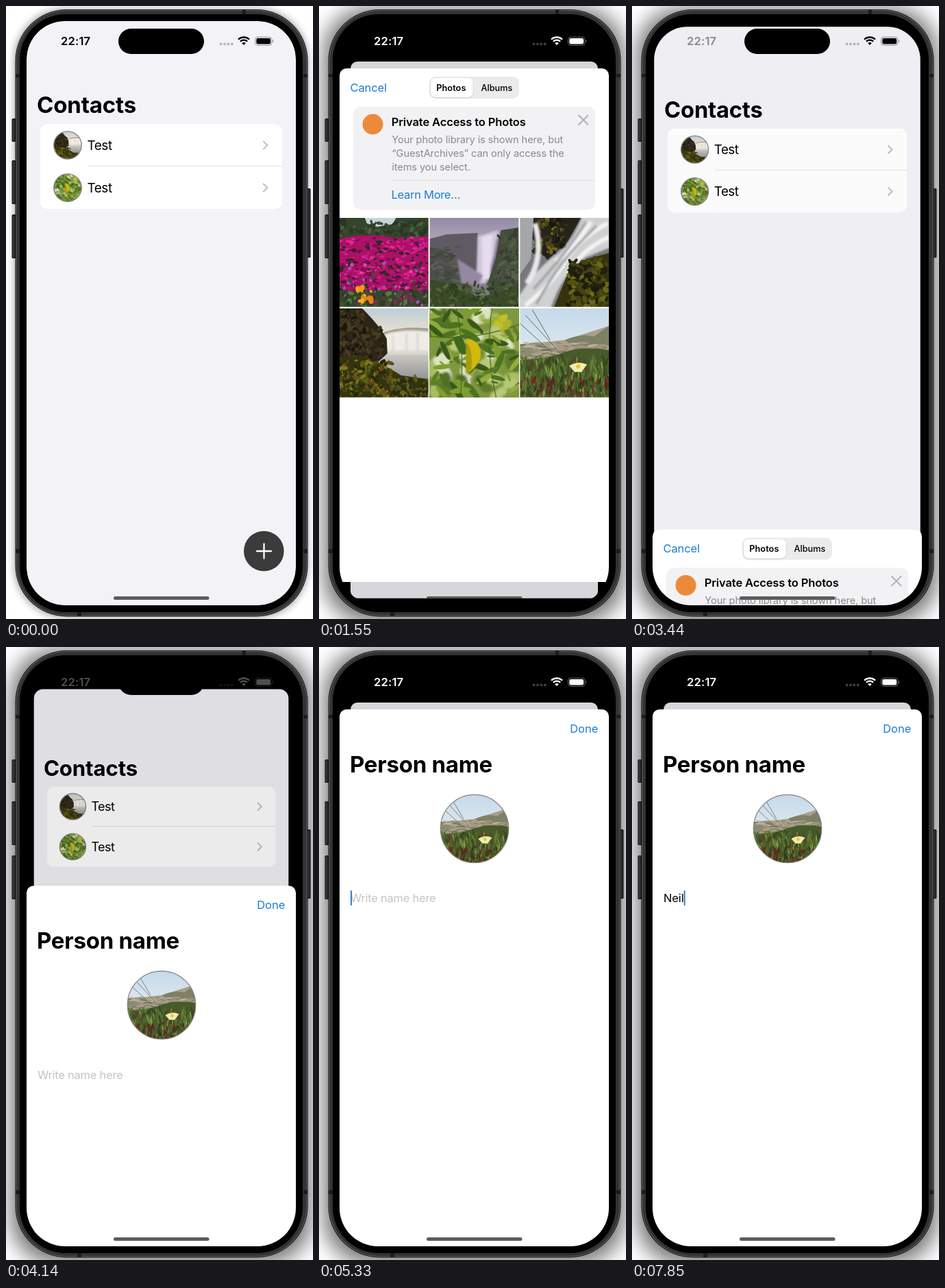
Animation, 448 px wide and 894 px high, one loop 8 s. Source, as an HTML page:

```html
<!DOCTYPE html>
<html lang="en">
<head>
<meta charset="utf-8">
<title>Contacts</title>
<style>
html, body { margin: 0; width: 100%; height: 100%; overflow: hidden; background: #fff; }
svg { display: block; }
#stage { width: 448px; height: 894px; }
text { font-family: Inter, "Liberation Sans", sans-serif; font-optical-sizing: none; white-space: pre; }
</style>
</head>
<body>
<script>
const LOOP = 8000, STEP = 70, BLUE = '#1c7dd6', NAME = 'Neil';

// markup helpers
let seed = 7;
const rnd = () => (seed = (seed * 16807) % 2147483647) / 2147483647;
const rect = (x, y, w, h, r, fill, more = '') =>
  `<rect x="${x}" y="${y}" width="${w}" height="${h}" rx="${r}" fill="${fill}" ${more}/>`;
const circle = (x, y, r, fill, more = '') => `<circle cx="${x}" cy="${y}" r="${r}" fill="${fill}" ${more}/>`;
const path = (d, fill, more = '') => `<path d="${d}" fill="${fill}" ${more}/>`;
const line = (d, color, w, more = '') =>
  `<path d="${d}" fill="none" stroke="${color}" stroke-width="${w}" ${more}/>`;
const text = (x, y, size, weight, fill, gap, str, more = '') =>
  `<text x="${x}" y="${y}" font-size="${size}" font-weight="${weight}" fill="${fill}" letter-spacing="${gap}" ${more}>${str}</text>`;
const grad = (id, ...stops) => `<linearGradient id="${id}" x2="0" y2="1">` +
  stops.map((c, i) => `<stop offset="${i / (stops.length - 1)}" stop-color="${c}"/>`).join('') + '</linearGradient>';
const blur = (id, dev) =>
  `<filter id="${id}" x="-50%" y="-50%" width="200%" height="200%"><feGaussianBlur stdDeviation="${dev}"/></filter>`;
const photo = (id, body) =>
  `<symbol id="${id}" viewBox="0 0 130 130"><g filter="url(#lens)">${body}</g></symbol>`;
const soft = body => `<g filter="url(#soft)">${body}</g>`;

// scattered specks inside a box
function specks(n, [x, y, w, h], rx, ry, colors, tilt = 180) {
  let out = '';
  for (let i = 0; i < n; i++) {
    const cx = (x + rnd() * w).toFixed(1), cy = (y + rnd() * h).toFixed(1), k = 0.5 + rnd();
    const turn = ((rnd() - 0.5) * tilt).toFixed(0), fill = colors[Math.floor(rnd() * colors.length)];
    out += `<ellipse cx="${cx}" cy="${cy}" rx="${(rx * k).toFixed(1)}" ry="${(ry * k).toFixed(1)}" fill="${fill}" transform="rotate(${turn} ${cx} ${cy})"/>`;
  }
  return out;
}

const flowers = photo('flowers',
  rect(-5, -5, 140, 140, 0, '#35452b') + path('M35-5H85L78 9 55 13 40 8z', '#c9d3da') +
  specks(90, [0, 4, 130, 22], 3.5, 2, ['#27361f', '#4d5f3b', '#3a4a35', '#2b3a28']) +
  path('M-5 32Q30 22 65 27T135 26V106H-5z', '#ac1068') +
  specks(330, [0, 29, 130, 78], 3, 1.5, ['#d61a88', '#e02b98', '#b81273', '#7c0d4e', '#4a1a36', '#2f2a26'], 40) +
  specks(90, [0, 66, 130, 62], 2, 1.8, ['#3c4b2b', '#a050b4', '#d050a8', '#2b3520']) +
  specks(60, [0, 108, 130, 22], 4, 2.5, ['#3f552d', '#2c3b22', '#5b7a3a', '#7a2a58']) +
  specks(16, [27, 102, 20, 20], 4, 3, ['#f29a12', '#ffb01f', '#e58410']));

const valley = photo('valley',
  rect(-5, -5, 140, 140, 0, '#80768d') + rect(-5, -5, 140, 36, 0, 'url(#dusk)') +
  path('M-5 32 25 24 70 22 72 100H-5z', '#5f5a63') +
  path('M-5 44Q28 38 55 84L70 130H-5z', '#4b4f48') +
  specks(60, [0, 40, 44, 55], 5, 1.5, ['#545650', '#43473f', '#5d5c5d'], 60) +
  soft(path('M70 27 100 18 94 55 82 96H68z', '#cfc5da') + path('M76 28 92 24 88 90H77z', '#e6dced') +
    path('M40 60 78 84 70 100 46 96z', '#9688a2')) +
  path('M130 14 104 18 96 60 84 98 96 112 135 104z', '#454c3d') +
  specks(70, [99, 22, 34, 76], 5, 2, ['#363e30', '#56604a', '#4a553b']) +
  path('M-5 90Q30 92 52 108T135 96V135H-5z', '#3a4a28') +
  specks(120, [0, 96, 130, 34], 4, 1.6, ['#48602e', '#2f3d1f', '#56693a', '#3d4c2a']));

const rapids = photo('rapids',
  rect(-5, -5, 140, 140, 0, '#77777a') + path('M20-5H92L70 34 40 62 18 30z', '#26241a') +
  specks(80, [22, 0, 46, 50], 4, 2.5, ['#4a4418', '#17160f', '#333018', '#6e6420', '#222018']) +
  path('M-5-5H20L16 60-5 90z', '#a5a6a8') +
  soft(path('M135-5H92Q78 36 50 56T-5 120V135H44Q62 80 96 58L135 42z', '#cfd0d2') +
    line('M128 8Q86 30 66 64T8 128M104 6Q76 48 52 64M130 28Q90 46 70 82', '#f4f4f4', 6) +
    line('M112 12Q82 40 62 66T24 126M96 6Q70 50 20 104', '#9c9da0', 3.5) +
    line('M22 8Q36 60 10 96', '#e8e8ea', 8)) +
  path('M135 50 98 60 72 76 48 135H135z', '#35330f') +
  specks(170, [70, 60, 60, 70], 4.5, 2.5, ['#55520f', '#22210f', '#434214', '#6d6918', '#1b1a10']));

const falls = photo('falls',
  rect(-5, -5, 140, 140, 0, 'url(#cream)') + path('M60 36Q95 24 135 30V70H60z', '#a69c8a') +
  soft(path('M66 38Q90 29 135 34V68H66z', '#efece8') + line('M78 40V66M98 36V66M114 36V66', '#dcd7cf', 3) +
    path('M56 62H135V72H56z', '#d9d5cf')) +
  rect(50, 68, 85, 40, 0, 'url(#pool)') +
  path('M-5-5H28Q44 10 60 30L69 44 70 66 50 84H-5z', '#2d2518') +
  specks(130, [0, 2, 34, 72], 4, 2.2, ['#3f321c', '#1b160f', '#4d3c20', '#2a2a16']) +
  specks(60, [30, 28, 34, 44], 4, 2.2, ['#3f321c', '#1b160f', '#4a3a20', '#2a2616']) +
  path('M-5 72Q30 66 54 78T90 98L135 104V135H-5z', '#34350f') +
  specks(190, [0, 76, 78, 54], 3.4, 1.9, ['#5f6016', '#24250e', '#7d771d', '#4a4a12', '#6d4a1a', '#2b2a12']) +
  specks(70, [76, 102, 54, 28], 4, 2, ['#50501a', '#2a2a11', '#68621d']));

const leaves = photo('leaves',
  rect(-5, -5, 140, 140, 0, '#7f9840') +
  soft(specks(60, [0, 0, 130, 130], 11, 8, ['#a8bd62', '#dde3c2', '#5d7a2b', '#b9c878', '#8ea647', '#55702a'])) +
  specks(70, [0, 0, 130, 130], 12, 3.2, ['#4c7320', '#7f9f2b', '#385a19', '#93ad3c', '#5f7e28'], 150) +
  line('M38-5Q52 60 44 135M92-5Q80 60 98 135M-5 40Q60 50 135 22', '#48651f', 1.3) +
  path('M34 44Q50 30 54 66Q44 74 34 44z', '#3f681d') +
  path('M53 44Q74 46 75 68 72 86 53 95z', '#d2b90e') + path('M53 50Q63 58 61 88L53 95z', '#a89a0c') +
  specks(8, [92, 12, 22, 24], 6, 4, ['#c3bf2c', '#a9b32f']));

const dune = photo('dune',
  rect(-5, -5, 140, 140, 0, 'url(#sky)') + path('M-5 53 30 50 66 46 135 24V100H-5z', '#ab9f8a') +
  path('M66 46Q90 36 108 41L135 22V54L80 58z', '#7d8266') + path('M-5 56Q22 52 40 60L-5 72z', '#8b8c75') +
  specks(110, [0, 50, 130, 26], 6, 1.2, ['#c2b49e', '#8f866e', '#777a5f', '#a1957f'], 30) +
  path('M-5 76Q40 74 66 64T135 62V135H-5z', '#465a2a') +
  specks(280, [0, 72, 130, 58], 1.3, 6, ['#647f34', '#34481f', '#7c9a46', '#4e6a2a', '#56702f', '#5f3d2a'], 50) +
  specks(110, [0, 102, 130, 28], 1.3, 4.5, ['#5a2a20', '#743328', '#2e3a1a', '#4a5c2a'], 60) +
  line('M0 22 46 64M8 10 54 60M18 2 44 46', '#5d6a5c', 1) +
  path('M72 84Q85 76 98 82L90 93H80z', '#f0edaa') + circle(85, 85, 3, '#e0c93a'));

const avatar = (id, x, y, r) =>
  `<g clip-path="url(#clip-${id})"><use href="#${id}" x="${x - r}" y="${y - r}" width="${2 * r}" height="${2 * r}"/></g>` +
  circle(x, y, r - 0.3, 'none', 'stroke="#858585" stroke-width="1.3"');
const avatarClip = (id, x, y, r) => `<clipPath id="clip-${id}">${circle(x, y, r, '#000')}</clipPath>`;

const contact = (id, y) => avatar(id, 90, y, 20.5) + text(118.5, y + 7, 19, 400, '#000', -0.5, 'Test') +
  line(`M375.8 ${y - 5.5}l5.6 5.5-5.6 5.5`, '#bfbfc3', 2, 'stroke-linecap="round" stroke-linejoin="round"');

const contacts = rect(30, 22, 393, 852, 55, '#f2f2f7', 'id="card"') +
  text(45, 156, 33, 700, '#000', -0.15, 'Contacts') +
  rect(50, 172, 353, 124, 10, '#fff') + contact('falls', 203) + contact('leaves', 265) +
  rect(119, 233, 284, 0.8, 0, '#dcdcde') +
  circle(376.3, 795, 29.3, '#3b3b3c') +
  line('M366 795h21M376.5 784.5v21', '#fff', 2.3, 'stroke-linecap="round"') +
  rect(30, 22, 393, 852, 55, '#000', 'id="dim"');

const tiles = ['flowers', 'valley', 'rapids', 'falls', 'leaves', 'dune'].map((id, i) =>
  `<use href="#${id}" x="${30 + (i % 3) * 131.67}" y="${i < 3 ? 309 : 441}" width="129.67" height="129.67"/>`).join('');

const picker = `<g id="head">` + text(45.5, 125, 16.5, 400, BLUE, -0.1, 'Cancel') +
  rect(161, 103, 131, 32, 9, '#ebebec') +
  rect(163, 106, 61.5, 28, 7, '#000', 'opacity=".13" filter="url(#soft)"') +
  rect(163, 105, 61.5, 28, 7, '#fff') +
  text(171.2, 123.8, 12.7, 600, '#000', 0.1, 'Photos') + text(236.5, 123.8, 12.7, 500, '#000', 0, 'Albums') +
  rect(50, 147, 353, 150, 10, '#f2f2f4') + circle(78.5, 172.5, 15, '#ec8a3a') +
  text(105.8, 175, 16.5, 600, '#000', -0.12, 'Private Access to Photos') +
  ['Your photo library is shown here, but', '“GuestArchives” can only access the', 'items you select.']
    .map((s, i) => text(106.3, 199.6 + i * 20, 14.6, 400, '#8a8a8e', -0.1, s)).join('') +
  rect(106, 254, 297, 0.8, 0, '#d6d6d9') + text(105.6, 281, 16.5, 400, BLUE, -0.3, 'Learn More…') +
  line('M379 159.5l13.5 13.5M392.5 159.5l-13.5 13.5', '#b0b0b3', 2, 'stroke-linecap="round"') +
  `</g><g id="tiles">${tiles}</g>`;

const form = text(366.2, 125, 16.5, 400, BLUE, 0, 'Done') +
  text(45, 183, 33, 700, '#000', -0.25, 'Person name') + avatar('dune', 227, 265, 50) +
  text(46, 372.3, 16.5, 400, '#c4c4c7', -0.25, 'Write name here', 'id="hint"') +
  text(46, 372.3, 16.5, 400, '#000', -0.1, '', 'id="name"') +
  rect(46, 355, 2, 22, 0.8, '#2a7fd4', 'id="caret"');

const status = text(80, 57, 16.5, 600, '#000', 0.2, '22:17', 'id="clock"') +
  `<g id="icons" fill="#000" stroke="#000" stroke-width="0">` +
  [313.6, 319, 324.4, 329.8].map(x => `<circle cx="${x}" cy="55.5" r="1.9" opacity=".25"/>`).join('') +
  `<path d="M339 48.8a11.3 11.3 0 0 1 16 0M341.8 51.7a7.4 7.4 0 0 1 10.4 0" fill="none" stroke-width="2.3"/>
   <path d="M344.2 54.2a3.9 3.9 0 0 1 5.6 0L347 57z"/>
   <rect x="363.5" y="45.3" width="24.5" height="12" rx="3.8" fill="none" stroke-width="1" opacity=".4"/>
   <rect x="365.3" y="47.1" width="20.9" height="8.4" rx="2.3"/>
   <path d="M389.3 49.3q2 2 0 4z" opacity=".5"/></g>`;

const sideKey = (x, y, h) => rect(x, y, 6, h, 1.5, '#191919') + rect(x + 1, y + 1, 3, h - 2, 1, '#353535');
const phone = sideKey(8.5, 164, 34) + sideKey(8.5, 225, 64) + sideKey(8.5, 304, 64) + sideKey(438.5, 266, 101) +
  rect(13.5, 5, 427, 885.5, 75, '#111') + rect(14.5, 6, 425, 883.5, 74, '#666') +
  rect(15.5, 7, 423, 881.5, 73, '#333') +
  [[14, 99, 6, 5], [434, 99, 6, 5], [14, 792, 6, 6], [434, 792, 6, 6], [345, 6, 5, 6], [104, 884, 6, 6]]
    .map(([x, y, w, h]) => rect(x, y, w, h, 0, '#1c1c1c')).join('') +
  rect(20, 12, 413, 872, 67, '#000');

document.body.innerHTML = `<svg id="stage" viewBox="0 0 448 894"><defs>
${blur('lens', 0.5)}${blur('soft', 1.6)}${blur('near', 6)}${blur('far', 15)}
${grad('dusk', '#8d87a0', '#b0a2b8')}${grad('cream', '#b9cbd8', '#efe3cf', '#e8dcc8', '#e8dcc8')}
${grad('pool', '#c9c6c1', '#8b8f90')}${grad('sky', '#c3d8ea', '#dfe8ee', '#e5ebec')}
${flowers}${valley}${rapids}${falls}${leaves}${dune}
${avatarClip('falls', 90, 203, 20.5)}${avatarClip('leaves', 90, 265, 20.5)}${avatarClip('dune', 227, 265, 50)}
<clipPath id="screen">${rect(30, 22, 393, 852, 56, '#000')}</clipPath></defs>
${rect(0, 0, 448, 894, 0, '#fff')}
${rect(13, 5, 427, 886, 73, '#000', 'id="near-shade" filter="url(#near)"')}
${rect(7, 3, 439, 896, 66, '#000', 'id="far-shade" filter="url(#far)"')}
${phone}
<g clip-path="url(#screen)">
  <g id="main">${contacts}</g>
  ${rect(164, 33, 125, 37, 18.5, '#000')}
  ${status}
  <g id="sheet"><path id="paper" fill="#fff"/><g id="picker">${picker}</g><g id="form">${form}</g></g>
  ${rect(157, 861, 139.5, 5, 2.5, '#5c5c5e', 'id="bar"')}
</g></svg>`;

const $ = id => document.getElementById(id);
const set = (id, attrs) => { for (const k in attrs) $(id).setAttribute(k, attrs[k]); };
const show = (id, on) => set(id, { visibility: on ? 'inherit' : 'hidden' });
const clamp = v => Math.max(0, Math.min(1, v));
const last = (table, t, start) => table.reduce((v, [at, next]) => t >= at ? next : v, start);
const spring = ms => 1 - (1 + 0.015 * ms) * Math.exp(-0.015 * ms);
const gray = v => { const n = Math.round(255 * v); return `rgb(${n},${n},${n})`; };

// first visible step, spring origin, last step, sheet rises
const moves = [[780, 731, 1270, true], [3230, 3210, 3860, false], [4000, 3986, 4560, true]];
const shade = [[500, 0.5], [570, 1]];
const blink = [[5330, 1], [6030, 0.66], [6100, 0.33], [6170, 0], [6380, 0.33], [6450, 0.66], [6520, 1]];
const typing = [[6940, 1], [7360, 2], [7710, 3], [7850, 4]];

function draw(t) {
  let p = 0, clock = 0, icons = 0, radius = 55;
  const move = moves.filter(m => t >= m[0]).pop();
  if (move) {
    const [start, origin, end, up] = move;
    const now = Math.min(end, start + Math.floor((t - start) / STEP) * STEP);
    const age = now - origin, q = now >= end ? 1 : spring(age);
    p = up ? q : 1 - q;
    clock = up ? clamp((age - 95) / 190) : clamp((450 - age) / 410);
    icons = up ? clock : clamp((190 - age) / 190);
    radius = up ? 20 - 9 * p : 10 + 45 * q;
  }

  const dark = last(shade, t, 0);
  set('near-shade', { opacity: 0.4 * (1 - dark) });
  set('far-shade', { opacity: 0.55 * dark });

  set('main', { transform: `translate(${30 + 16 * p} ${22 + 59 * p}) scale(${1 - 0.0814 * p}) translate(-30 -22)` });
  set('card', { rx: radius });
  set('dim', { rx: radius, opacity: 0.115 * p });
  set('clock', { fill: gray(clock) });
  set('icons', { fill: gray(icons), stroke: gray(icons) });

  const picking = t < 4000;
  set('sheet', { transform: `translate(0 ${783 * (1 - p)})` });
  show('sheet', p > 0);
  set('paper', { d: `M30 101a10 10 0 0 1 10-10h373a10 10 0 0 1 10 10V${picking ? 840 : 974}H30z` });
  show('picker', p > 0 && picking);
  show('form', p > 0 && !picking);
  show('head', p > 0 && picking && t >= 1480);
  show('tiles', p > 0 && picking && t >= 1550);
  set('bar', { height: picking && p === 1 ? 3 : 5 });

  const typed = last(typing, t, 0);
  $('name').textContent = NAME.slice(0, typed);
  show('hint', !picking && !typed);
  set('caret', { x: 46 + (typed ? $('name').getComputedTextLength() : 0), opacity: last(blink, t, 0) });
}

const begin = performance.now();
function tick() {
  draw((performance.now() - begin) % LOOP);
  requestAnimationFrame(tick);
}
tick();
</script>
</body>
</html>
```
